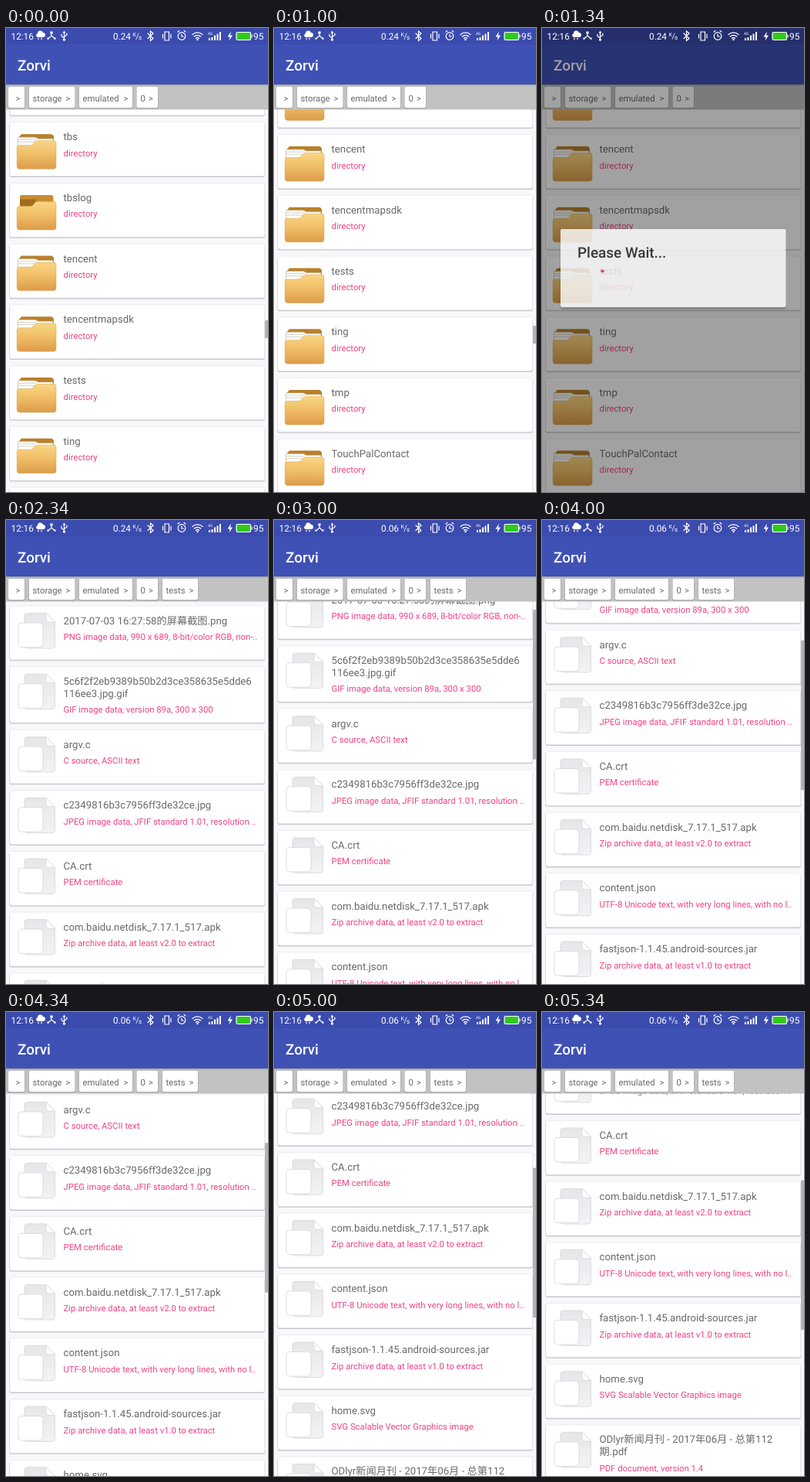
Write an HTML page that moves like this. It is 340 px wide and 600 px high and loops after 5.68 s.

```html
<!DOCTYPE html>
<html lang="en">
<head>
<meta charset="utf-8">
<title>File browser</title>
<style>
  html, body { margin: 0; width: 100%; height: 100%; overflow: hidden; background: #f8f8fa; }
  svg { display: block; width: 100%; height: 100%; }
  text {
    font-family: Roboto, "Noto Sans CJK SC", "Noto Sans CJK", sans-serif;
    white-space: pre; text-rendering: geometricPrecision;
  }
  .name { font-size: 13.22px; fill: #696969; }
  .info { font-size: 11.33px; fill: #f04284; }
  .chip { font-size: 11.33px; fill: #696969; }
  .head { font-size: 18.9px; font-weight: 500; }
  .stat { font-size: 11.8px; fill: #fff; }
</style>
</head>
<body>
<svg viewBox="0 0 340 600" preserveAspectRatio="none">
  <defs>
    <linearGradient id="gold" x2="0" y2="1">
      <stop offset="0" stop-color="#f9d784"/>
      <stop offset=".5" stop-color="#f0bc66"/>
      <stop offset="1" stop-color="#dd9c4a"/>
    </linearGradient>
    <linearGradient id="sheet" x2="0" y2="1">
      <stop offset="0" stop-color="#e6e6e9"/>
      <stop offset="1" stop-color="#f3f3f6"/>
    </linearGradient>
    <path id="front" fill="url(#gold)" stroke="#d39c48" stroke-width=".5"
      d="M14.2 33q0-3 3-3H31q3 0 5-2.5l1.5-2q1.5-1.5 4-1.5H62q3 0 3 3V57q0 3.5-3.5 3.5H17.7q-3.5 0-3.5-3.5z"/>
    <g id="empty">
      <path fill="#c98d30" d="M18 34V18q0-2.5 2.5-2.5H58q3.5 0 3.5 3V34z"/>
      <path fill="#a06c20" d="M18 30V21H40l-6 9z"/>
      <use href="#front"/>
    </g>
    <g id="folder">
      <path fill="#b98028" d="M17 30V19l3-3.5H58q3 0 4 3V30z"/>
      <path fill="#fff" stroke="#b9b1a0" stroke-width=".6" d="M15.5 32V19.5H38l4 2H61V32zM15.5 22.7H40M15.5 25.7H38"/>
      <use href="#front"/>
    </g>
    <g id="file" stroke="#d6d6dc" stroke-width=".8">
      <path fill="url(#sheet)" d="M24 13q0-3.5 3.5-3.5H52L63.5 21V51.5q0 3.5-3.5 3.5H27.5q-3.5 0-3.5-3.5z"/>
      <path fill="#fff" d="M52 9.5V18q0 3 3 3H63.5z"/>
      <rect x="16" y="22" width="32" height="31.5" rx="4" fill="#fff"/>
    </g>
  </defs>

  <rect width="340" height="600" fill="#f8f8fa"/>
  <g id="folders"></g>
  <g id="files"></g>
  <rect id="thumb" x="336" width="4" fill="#b2b2b4"/>

  <rect y="73" width="340" height="32.5" fill="#c2c2c2"/>
  <rect y="73" width="340" height="1.5" fill="#000" opacity=".15"/>
  <g id="chips"></g>
  <rect y="20" width="340" height="53" fill="#3f51b5"/>
  <rect width="340" height="21" fill="#3b4bae"/>
  <text class="head" x="15" y="54.5" fill="#fff">Zorvi</text>
  <rect id="dim" width="340" height="600"/>

  <g stroke="#fff" fill="none" stroke-width="1.2" stroke-linecap="round">
    <text class="stat" x="6.5" y="14.5" stroke="none">12:16</text>
    <path fill="#fff" stroke="none" d="M41 12a2.600 2.600 0 0 1 0-5 3.600 3.600 0 0 1 7-1 3 3 0 0 1 0 6zM41 13h2l-1 3zM45 13h2l-1 3z"/>
    <path d="M59 6v4L54.5 14M59 10l4.500 4"/>
    <path fill="#fff" d="M58 5h2v2h-2zM54 13h1v1h-1zM63 13h1v1h-1z"/>
    <path d="M75.5 15V5M75.5 13L72 10.5V8M75.5 11.5L79 9V7"/>
    <path fill="#fff" stroke="none" d="M73.5 6.5l2-3 2 3zM74 14h3v2.500h-3z"/>
    <text id="rate" class="stat" x="139" y="14.5" stroke="none"></text>
    <text x="164.5" y="10.5" font-size="7" fill="#fff" stroke="none">K</text>
    <path stroke-width=".8" d="M169 14.5L172 7"/>
    <text x="172" y="15" font-size="8" fill="#fff" stroke="none">s</text>
    <path d="M184 7l7 6.5-3.500 3V4l3.500 3-7 6.5"/>
    <path d="M206 5h5.500v11H206zM203.500 8v5M214 8v5"/>
    <circle cx="228" cy="10.5" r="4.8"/>
    <path d="M228 8v3h2.500M223 5l2-1.500M233 5l-2-1.500"/>
    <path d="M242 8.5a9.500 9.500 0 0 1 13 0M244.300 11a6 6 0 0 1 8.400 0M246.500 13.300a3 3 0 0 1 4 0"/>
    <circle cx="248.5" cy="15" r=".6" fill="#fff"/>
    <path stroke-width="2" stroke-linecap="butt" d="M264 16v-3M267.500 16v-4M271 16V9.500M274.500 16V7.500M278 16V5"/>
    <text x="262" y="9" font-size="5" fill="#fff" stroke="none">4G</text>
    <path fill="#fff" stroke="none" d="M292 4.500l-4.500 7h3l-1 5 4.500-7h-3z"/>
    <rect x="299" y="5.5" width="18.5" height="10" rx="1.5" fill="#32c91e"/>
    <path d="M319 9v3"/>
    <text class="stat" x="321" y="14.5" stroke="none">95</text>
  </g>

  <g id="dialog">
    <rect x="23.5" y="262" width="293" height="102" rx="3" fill="#000" opacity=".2"/>
    <rect x="24" y="260" width="292.5" height="101" rx="2" fill="#fff"/>
    <text class="head" x="46" y="296.5" fill="#212121">Please Wait...</text>
    <circle id="spin" cx="69" cy="326" r="15" fill="none" stroke="#f0306c" stroke-width="3.6" pathLength="100"/>
  </g>
</svg>
<script>
const $ = id => document.getElementById(id);
const LOOP = 5680, PITCH = 78.7;

function card(y, icon, lines, info) {
  const extra = (lines.length - 1) * 15.6;
  const h = lines.length > 1 ? 72.4 : 69.8;
  const names = lines.map((s, i) => `<text class="name" x="74.5" y="${23.6 + i * 15.6}">${s}</text>`).join('');
  return `<g transform="translate(0 ${y})">
    <rect x="4.5" y="1.5" width="331.5" height="${h}" rx="2.5" fill="#c6c6ca"/>
    <rect x="5" width="330.5" height="${h}" rx="2" fill="#fff" stroke="#e6e6ec" stroke-width=".7"/>
    <use href="#${icon}"/>${names}
    <text class="info" x="74.5" y="${44.1 + extra}">${info}</text></g>`;
}

const dirs = ['', 'tbs', 'tbslog', 'tencent', 'tencentmapsdk', 'tests', 'ting', 'tmp', 'TouchPalContact'];
$('folders').innerHTML = dirs.map((s, i) =>
  card(121.7 + (i - 1) * PITCH, s === 'tbslog' ? 'empty' : 'folder', [s], 'directory')).join('');

const docs = [
  ['2017-07-03 16:27:58的屏幕截图.png', 'PNG image data, 990 x 689, 8-bit/color RGB, non-..'],
  ['5c6f2f2eb9389b50b2d3ce358635e5dde6|116ee3.jpg.gif', 'GIF image data, version 89a, 300 x 300'],
  ['argv.c', 'C source, ASCII text'],
  ['c2349816b3c7956ff3de32ce.jpg', 'JPEG image data, JFIF standard 1.01, resolution ..'],
  ['CA.crt', 'PEM certificate'],
  ['com.baidu.netdisk_7.17.1_517.apk', 'Zip archive data, at least v2.0 to extract'],
  ['content.json', 'UTF-8 Unicode text, with very long lines, with no l..'],
  ['fastjson-1.1.45.android-sources.jar', 'Zip archive data, at least v1.0 to extract'],
  ['home.svg', 'SVG Scalable Vector Graphics image'],
  ['ODlyr新闻月刊 - 2017年06月 - 总第112|期.pdf', 'PDF document, version 1.4']
];
let y = 111;
$('files').innerHTML = docs.map(([name, info]) => {
  const lines = name.split('|');
  const out = card(y, 'file', lines, info);
  y += PITCH + (lines.length > 1 ? 2.6 : 0);
  return out;
}).join('');

// x, width, label, label x, arrow x
const chips = [
  [3, 21, '', 8, 12.5], [30, 59.5, 'storage', 34.5, 77.5], [95, 69, 'emulated', 99.5, 152.5],
  [169.5, 27.5, '0', 174.5, 185], [203, 46, 'tests', 207.5, 237.5]
];
$('chips').innerHTML = chips.map(([x, w, s, tx, ax]) => `<g>
  <rect x="${x - .4}" y="77" width="${w + .8}" height="27.3" rx="2" fill="#9c9c9c"/>
  <rect x="${x}" y="76" width="${w}" height="27.3" rx="2" fill="#fff"/>
  <text class="chip" x="${tx}" y="94.5">${s}</text>
  <text class="chip" x="${ax}" y="94.5">&gt;</text></g>`).join('');
const lastChip = $('chips').lastElementChild;

// The screen refreshes in steps: start time and list scroll for each
const times = [0, 340, 670, 1000, 1340, 1670, 2000, 2340, 2670, 3000, 3340, 3670, 4000, 4340, 4670, 5000, 5340];
const scrolls = [0, 85, 141.5, 141.5, 141.5, 141.5, 0, 0, 6, 27, 59, 94, 129, 164, 205, 247, 288];

// Dialog steps: dim, opacity, spinner arc length, spinner angle
const waits = {
  1340: [.37, .8, 4, -58],
  1670: [.6, 1, 45, 20],
  2000: [.37, .6, 15, 200]
};

const show = (el, on) => el.setAttribute('display', on ? 'inline' : 'none');
const set = (id, attrs) => { for (const k in attrs) $(id).setAttribute(k, attrs[k]); };

function draw(t) {
  const i = times.findLastIndex(s => s <= t);
  const at = times[i], scroll = scrolls[i];
  const inside = at >= 2000, wait = waits[at];

  show($('folders'), !inside);
  show($('files'), inside);
  show(lastChip, inside);
  set(inside ? 'files' : 'folders', { transform: `translate(0 ${-scroll})` });

  show($('thumb'), at < 1340 || at > 2340);
  set('thumb', inside
    ? { y: 105.5 + scroll * .389, height: 193.5 }
    : { y: 378 + scroll * .05, height: 23 });
  $('rate').textContent = at < 3000 ? '0.24' : '0.06';

  show($('dim'), wait);
  show($('dialog'), wait);
  if (wait) {
    const [dim, opacity, arc, angle] = wait;
    set('dim', { opacity: dim });
    set('dialog', { opacity });
    set('spin', { 'stroke-dasharray': `${arc} ${100 - arc}`, transform: `rotate(${angle} 69 326)` });
  }
}

const start = performance.now();
function tick() {
  draw((performance.now() - start) % LOOP);
  requestAnimationFrame(tick);
}
tick();
</script>
</body>
</html>
```
